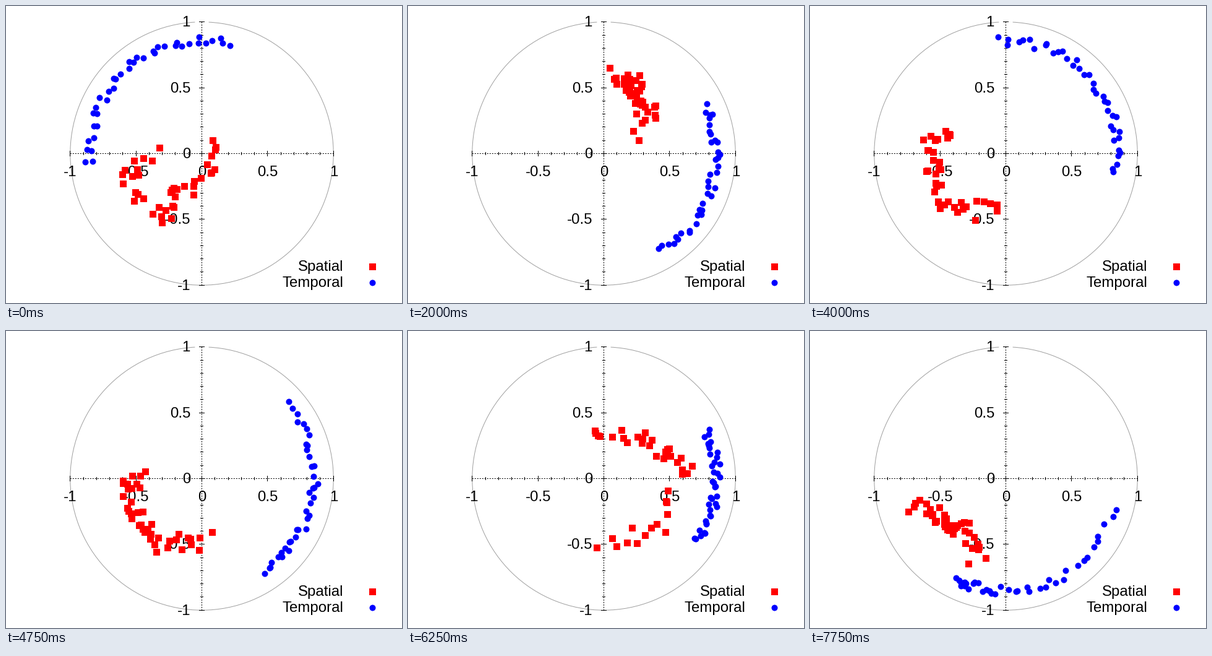
Animation, 640 px wide and 480 px high, one loop 8000 ms. Source, as a matplotlib script:

```python
import numpy as np
import matplotlib.pyplot as plt
from matplotlib.animation import FuncAnimation
from matplotlib.patches import Arc

W, H, DPI = 640, 480, 100
FRAMES, STEP = 32, 250
CX, CY, R = 316.5, 238.5, 212.7
PX = 72 / DPI
RED_COUNT, BLUE_COUNT = 40, 38

# Each pose: frame, sway in degrees on the way to the next pose,
# first, middle and last angle of the blue arc, path of the red cloud.
POSES = [
    (0, 50, (75, 130, 186),
     [.10 + .08j, .03 - .26j, -.20 - .28j, -.32 - .52j, -.60 - .18j, -.38 - .04j]),
    (5, -45, (45, 4, -46),
     [.37 + .48j, .52 + .36j, .41 + .22j, .54 + .05j, .56 - .18j, .38 - .44j]),
    (12, -35, (43, 5, -35),
     [-.26 + .57j, -.16 + .54j, -.32 + .43j, -.25 + .36j, -.20 + .28j, -.14 + .14j]),
    (16, -30, (93, 38, -10),
     [-.43 + .15j, -.57 + .06j, -.52 - .10j, -.54 - .32j, -.34 - .45j, -.09 - .40j]),
    (21, -50, (-24, -76, -115),
     [-.44 - .07j, -.58 - .20j, -.47 - .42j, -.28 - .48j, -.08 - .54j, .20 - .50j]),
    (25, -40, (26, -5, -35),
     [-.08 + .34j, .20 + .28j, .44 + .18j, .65 + .12j, .40 - .40j, -.02 - .58j]),
    (31, 0, (-16, -87, -115),
     [-.72 - .17j, -.55 - .25j, -.46 - .34j, -.36 - .38j, -.28 - .42j, -.20 - .62j]),
]


def spread(path, count):
    spots = np.linspace(0, len(path) - 1, count)
    return np.interp(spots, np.arange(len(path)), np.array(path))


def arc(angles):
    """Blue angles: a parabola through the first, middle and last one."""
    curve = np.polyfit([0, 0.5, 1], angles, 2)
    return np.polyval(curve, np.linspace(0, 1, BLUE_COUNT))


def swirl(a, b, s):
    """Turn cloud a about the centre into cloud b."""
    turn = np.angle(b.mean() / a.mean())
    rest = np.log(b / a * np.exp(-1j * turn))
    return a * np.exp(s * (rest + 1j * turn))


def clouds(frame):
    """Red and blue points of one frame as complex numbers on the unit disc."""
    k = max(i for i, p in enumerate(POSES) if p[0] <= frame)
    start, sway, angles, path = POSES[k]
    red, blue = spread(path, RED_COUNT), arc(angles)
    if frame > start:
        end, _, angles, path = POSES[k + 1]
        s = (frame - start) / (end - start)
        red = swirl(red, spread(path, RED_COUNT), s)
        blue += s * (arc(angles) - blue) + sway * np.sin(2 * np.pi * s)

    rng = np.random.default_rng(frame)
    red = red + rng.normal(0, 0.04, RED_COUNT) + 1j * rng.normal(0, 0.04, RED_COUNT)
    blue = np.radians(blue + rng.uniform(-2, 2, BLUE_COUNT))
    return red, rng.uniform(0.82, 0.89, BLUE_COUNT) * np.exp(1j * blue)


def to_px(z):
    return CX + R * z.real, CY - R * z.imag


fig = plt.figure(figsize=(W / DPI, H / DPI), dpi=DPI, facecolor="white")
ax = fig.add_axes([0, 0, 1, 1])
ax.set_xlim(0, W)
ax.set_ylim(H, 0)
ax.axis("off")


def line(x, y, **style):
    ax.plot(x, y, color="black", lw=PX, snap=False, solid_capstyle="butt",
            dash_capstyle="butt", **style)


def label(x, y, text, align):
    ax.text(x, y, text, family="Liberation Sans", size=24 * PX,
            ha=align, va="baseline", color="black")


def markers(shape, color, size, x=(), y=()):
    return ax.plot(x, y, shape, color=color, ms=size * PX, mew=0, zorder=5)[0]


def place(dots, z):
    x, y = to_px(z)
    dots.set_data(x - 0.5, y - 0.5)  # markers land on whole pixels


ax.add_patch(Arc((CX, CY), 2 * R, 2 * R, theta1=-87, theta2=267,
                 color="#a0a0a0", lw=PX))
line([CX - R, CX + R], [CY, CY], dashes=(2, 2))
line([CX, CX], [CY - R, CY + R], dashes=(2, 2))

for i in range(-10, 11):
    size = 4.5 if i % 5 == 0 else 2.5
    x, y = np.floor(to_px(i / 10 * (1 + 1j))) + 0.5
    line([x, x], [CY - size, CY + size])
    line([CX - size, CX + size], [y, y])
    if i % 5 == 0:
        text = f"{i / 10:g}"
        label(x, 275, text, "center")
        label(298, y + 7.5, text, "right")

label(545.5, 428, "Spatial", "right")
label(545, 454, "Temporal", "right")
markers("s", "red", 11, [592], [421])
markers("o", "blue", 10, [592], [447])

red_dots = markers("s", "red", 11)
blue_dots = markers("o", "blue", 10)


def update(frame):
    red, blue = clouds(frame)
    place(red_dots, red)
    place(blue_dots, blue)
    return red_dots, blue_dots


anim = FuncAnimation(fig, update, frames=FRAMES, interval=STEP,
                     repeat=True, repeat_delay=0, blit=False)
plt.show()
```
